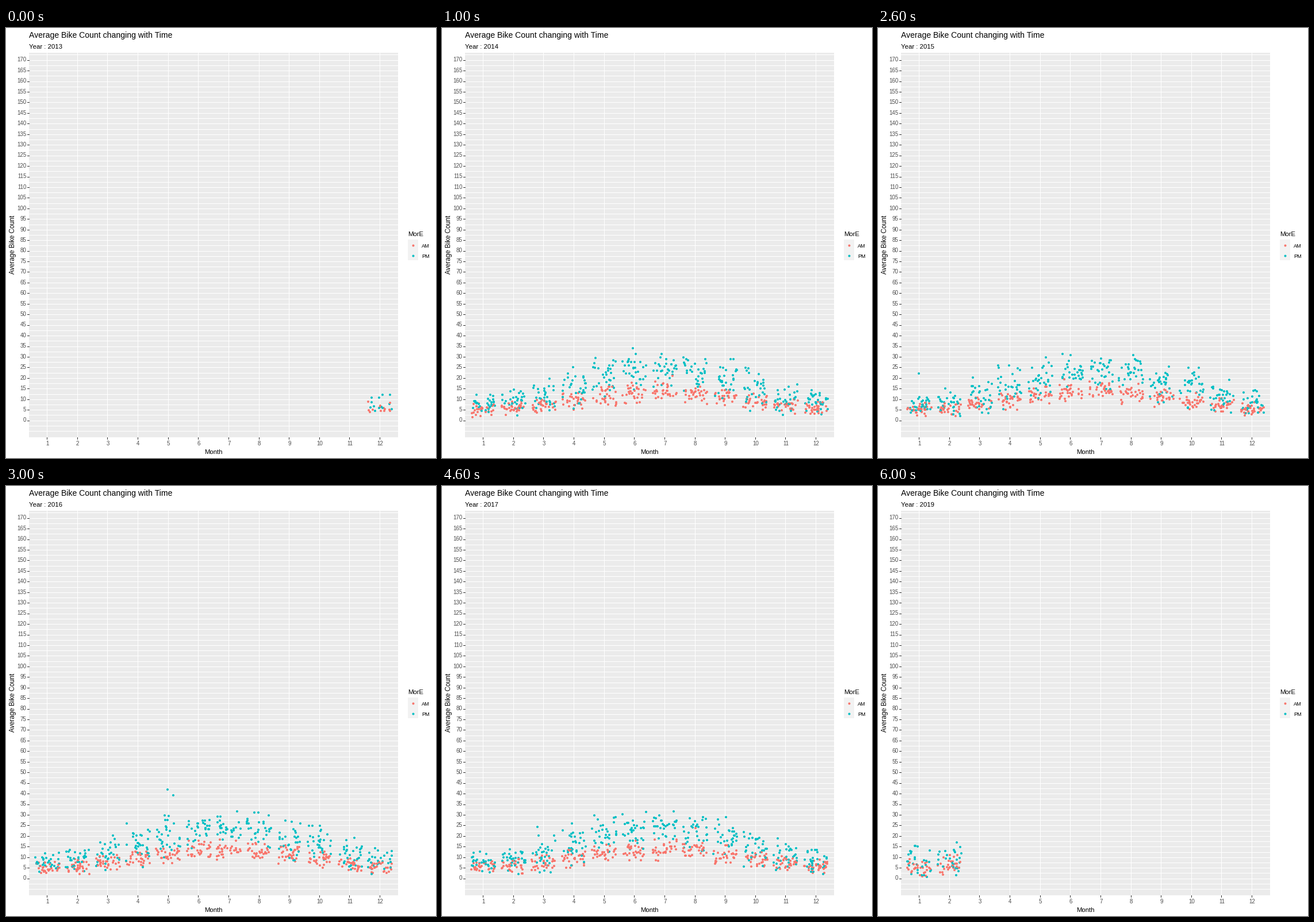
Write a matplotlib script that moves like this. It is 748 by 748 pixels and loops after 7000 ms.

```python
import numpy as np
import matplotlib
import matplotlib.pyplot as plt
from matplotlib.animation import FuncAnimation
from matplotlib.patches import Rectangle

SIZE, DPI = 748, 68
PT = 72 / DPI  # points per pixel
LEFT, RIGHT, TOP, BOTTOM = 40, 682, 43, 712
AM, PM = "#F8766D", "#00BFC4"
DOT = (4 * PT) ** 2
FIRST, LAST = 2013, 2019
TICK = "#4D4D4D"

# Exceptional days by year: (month, count, colour).
PEAKS = {
    2014: [(5.95, 34, PM), (7.25, 20.8, AM)],
    2015: [(0.98, 21.9, PM), (5.79, 19.3, AM)],
    2016: [(4.97, 41.9, PM), (5.16, 39, PM)],
    2017: [(2.79, 24.3, PM), (8.01, 23.6, AM)],
    2018: [(4.78, 165, AM), (3.28, 31.7, PM)],
}

matplotlib.rcParams["font.family"] = "Liberation Sans"


def x_px(month):
    return LEFT + 0.15 + (np.asarray(month) - 0.4) * (RIGHT - LEFT) / 12.2


def y_px(count):
    return 682.15 - 3.688 * np.asarray(count)


def snap(v):
    return np.floor(v) + 0.5


def season(month):
    """0 in midwinter, 1 in midsummer."""
    return np.sin(np.pi * (month - 0.9) / 12) ** 2


def coverage(year):
    """Months recorded in a year and days counted in each."""
    if year == FIRST:
        return [12], 13
    if year == LAST:
        return [1, 2], 28
    return range(1, 13), 30


def year_points(year):
    """Jittered daily counts, morning and afternoon drawn in turn."""
    rng = np.random.default_rng(year)
    months, days = coverage(year)
    wild = 1.6 if year == LAST else 1
    rows = []
    for month in months:
        s = season(month)
        am = 5 + 8.5 * s, 1.6 + 0.7 * s
        pm = 7.6 + 16.2 * s, 2.4 + 1.5 * s + 6.4 * s * (1 - s)
        for _ in range(days):
            for (mean, spread), color in ((am, AM), (pm, PM)):
                z = np.clip(rng.normal(), -2.3, 2)
                count = max(mean + wild * spread * z, rng.uniform(0.2, 2))
                rows.append((month + rng.uniform(-0.4, 0.4), count, color))
    rows += PEAKS.get(year, [])
    month, count, colors = zip(*rows)
    pts = np.column_stack([x_px(month), y_px(count)])
    return np.round(pts), colors


fig = plt.figure(figsize=(11, 11), dpi=DPI, facecolor="white")
ax = fig.add_axes([0, 0, 1, 1])
ax.set_xlim(0, SIZE)
ax.set_ylim(SIZE, 0)
ax.axis("off")


def box(x, y, w, h, color):
    ax.add_patch(Rectangle((x, y), w, h, fc=color, lw=0, zorder=0))


def label(x, y, text, px, color="black", ha="left", **kw):
    return ax.text(x, y, text, fontsize=px * PT, color=color, ha=ha,
                   va="baseline", **kw)


def lines(draw, at, start, end, color):
    draw(snap(at), start, end, colors=color, linewidths=PT,
         antialiased=False, zorder=1)


months = np.arange(1, 13)
counts = np.arange(0, 171, 5)

box(LEFT, TOP, RIGHT - LEFT, BOTTOM - TOP, "#EBEBEB")
lines(ax.hlines, y_px(np.arange(-5, 173, 2.5)), LEFT, RIGHT, "white")
lines(ax.vlines, x_px(months), TOP, BOTTOM, "white")
lines(ax.hlines, y_px(counts), LEFT - 3, LEFT, "#333333")
lines(ax.vlines, x_px(months), BOTTOM, BOTTOM + 3, "#333333")

for m in months:
    label(x_px(m) + 0.3, 726, str(m), 9.8, TICK, "center")
for c in counts:
    label(35.3, y_px(c) + 3.3, str(c), 9.8, TICK, "right")

label(40, 17, "Average Bike Count changing with Time", 14)
subtitle = label(40, 36, "", 11.4)
label(360.5, 741, "Month", 11.4, ha="center")
label(15.5, 377, "Average Bike Count", 11.5, ha="center", rotation=90,
      rotation_mode="anchor")

label(699, 362, "MorE", 11.4)
box(699, 368, 18, 36, "#F2F2F2")
for y, name, color in ((377.5, "AM", AM), (395.5, "PM", PM)):
    ax.scatter([708.5], [y], s=DOT, c=color, linewidths=0)
    label(723, y + 4.5, name, 9.2)

dots = ax.scatter([], [], s=DOT, linewidths=0, zorder=3)


def update(i):
    year = FIRST + i
    pts, colors = year_points(year)
    dots.set_offsets(pts)
    dots.set_facecolor(colors)
    subtitle.set_text(f"Year : {year}")
    return dots, subtitle


anim = FuncAnimation(fig, update, frames=LAST - FIRST + 1, interval=1000,
                     repeat=True, repeat_delay=0)
plt.show()
```
